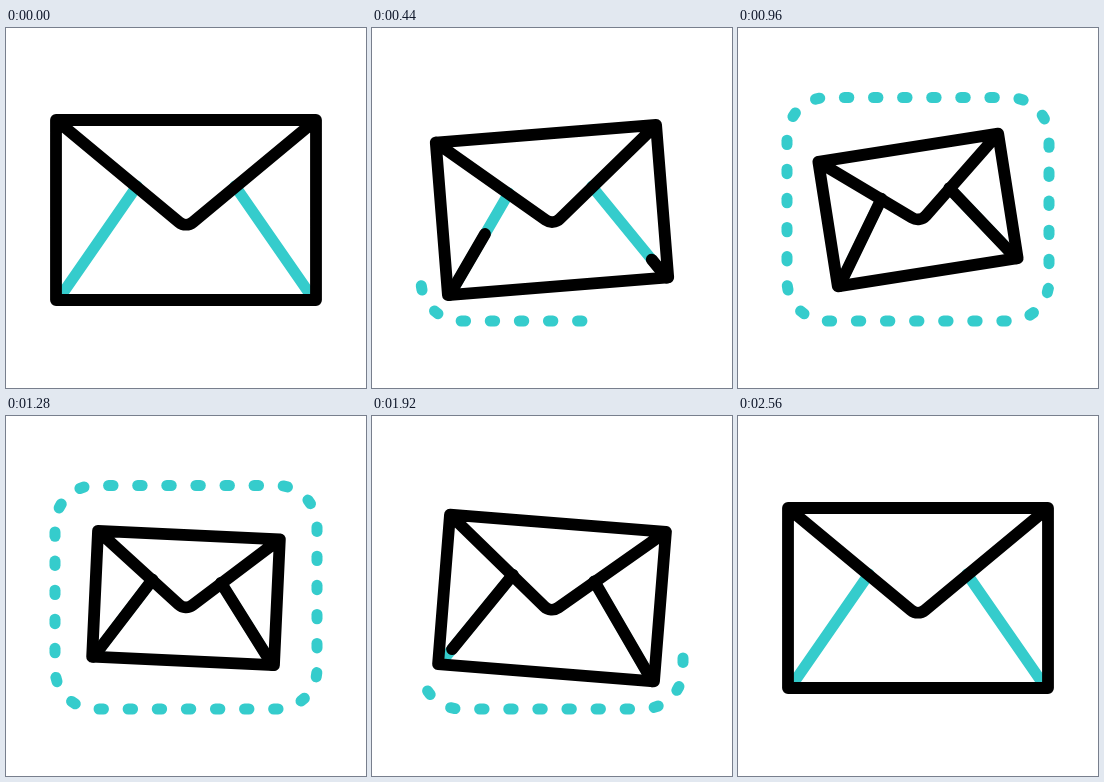
These frames come from a looping animation (360 px wide and 360 px high, 2.6 s). An HTML page with a canvas:

```html
<!DOCTYPE html>
<html lang="en">
<head>
<meta charset="utf-8">
<title>Envelope</title>
<style>
  html, body { margin: 0; width: 100%; height: 100%; overflow: hidden; background: #fff; }
  canvas { display: block; width: 360px; height: 360px; }
</style>
</head>
<body>
<canvas id="stage"></canvas>
<script>
const LOOP = 2600, STEP = 40, HOLD = 120;
const BLACK = '#000', CYAN = '#35cccc';
const LINE = 11.8;
const CENTER = { x: 180, y: 182 };
const TRAIL = { left: 49, right: 311, top: 69.5, bottom: 293, r: 40, pitch: 29.1, count: 31, reach: 945 };

const canvas = document.getElementById('stage');
const ctx = canvas.getContext('2d');
const ratio = window.devicePixelRatio || 1;
canvas.width = canvas.height = 360 * ratio;
ctx.scale(ratio, ratio);
ctx.lineCap = ctx.lineJoin = 'round';

const progress = (t, from, to) => Math.min(1, Math.max(0, (t - from) / (to - from)));
const smooth = (t, from, to) => {
  const u = progress(t, from, to);
  return u * u * (3 - 2 * u);
};
const cubic = (t, from, to) => {
  const u = progress(t, from, to);
  return u < 0.5 ? 4 * u ** 3 : 1 - 4 * (1 - u) ** 3;
};
const mix = (a, b, u) => ({ x: a.x + (b.x - a.x) * u, y: a.y + (b.y - a.y) * u });

function keyed(t, keys) {
  let value = keys[0][1];
  for (let i = 1; i < keys.length; i++) {
    const [t0, v0] = keys[i - 1], [t1, v1] = keys[i];
    if (t >= t0) value = v0 + (v1 - v0) * progress(t, t0, t1);
  }
  return value;
}

function line(a, b, color, width = LINE) {
  ctx.strokeStyle = color;
  ctx.lineWidth = width;
  ctx.beginPath();
  ctx.moveTo(a.x, a.y);
  ctx.lineTo(b.x, b.y);
  ctx.stroke();
}

// Point on the rounded frame, counter-clockwise from the lower left corner.
function trailPoint(distance) {
  const { left, right, top, bottom, r } = TRAIL;
  const w = right - left - 2 * r, h = bottom - top - 2 * r, arc = r * Math.PI / 2;
  const total = 2 * (w + h) + 4 * arc;
  let d = (distance + r * Math.PI / 18) % total;
  if (d < 0) d += total;
  const corners = [
    [left + r, bottom - r, w], [right - r, bottom - r, h],
    [right - r, top + r, w], [left + r, top + r, h]
  ];
  for (let i = 0; i < 4; i++) {
    const [cx, cy, side] = corners[i];
    const angle = Math.PI - i * Math.PI / 2;
    if (d <= arc) {
      const a = angle - d / r;
      return { x: cx + r * Math.cos(a), y: cy + r * Math.sin(a) };
    }
    d -= arc;
    if (d <= side) {
      const a = angle - Math.PI / 2;
      return {
        x: cx + r * Math.cos(a) + d * Math.sin(a),
        y: cy + r * Math.sin(a) - d * Math.cos(a)
      };
    }
    d -= side;
  }
}

function drawTrail(t) {
  const start = keyed(t, [[440, 0], [960, 29.2], [1280, 33], [1600, 38.5], [1920, 18.5], [2360, 0]]);
  const end = TRAIL.reach * (cubic(t, 30, 1140) - cubic(t, 1224, 2469));
  if (end < 2 + (t < 1224 ? 2 : 0)) return;
  for (let k = 0; k < TRAIL.count; k++) {
    const d = start + k * TRAIL.pitch;
    if (d > end) break;
    line(trailPoint(d - 2.2), trailPoint(d + 2.2), CYAN, 11);
  }
}

function drawFold(corner, inner, from, to) {
  line(corner, inner, CYAN, 11);
  if (to > from) line(mix(corner, inner, from), mix(corner, inner, to), BLACK);
}

function drawEnvelope(t) {
  const scale = 1 - 0.3 * (cubic(t, 70, 810) - cubic(t, 1550, 2320));
  const degrees = -9.1 * cubic(t, 70, 810) + 17.3 * cubic(t, 850, 1605) - 8.2 * cubic(t, 1550, 2320);
  const cos = scale * Math.cos(degrees * Math.PI / 180);
  const sin = scale * Math.sin(degrees * Math.PI / 180);
  const place = (x, y) => ({ x: CENTER.x + x * cos - y * sin, y: CENTER.y + x * sin + y * cos });

  const tl = place(-130, -90), tr = place(130, -90);
  const br = place(130, 90), bl = place(-130, 90);
  const tip = place(0, 18);

  drawFold(place(-128, 90), place(-49, -24), smooth(t, 1800, 2260), smooth(t, 180, 640));
  drawFold(place(128, 90), place(49, -24), smooth(t, 1940, 2340), smooth(t, 320, 740));

  ctx.strokeStyle = BLACK;
  ctx.lineWidth = LINE;
  ctx.beginPath();
  ctx.moveTo(tl.x, tl.y);
  for (const p of [tr, br, bl]) ctx.lineTo(p.x, p.y);
  ctx.closePath();
  ctx.moveTo(tl.x, tl.y);
  ctx.arcTo(tip.x, tip.y, tr.x, tr.y, 11);
  ctx.lineTo(tr.x, tr.y);
  ctx.stroke();
}

function draw(now) {
  let t = Math.floor((now % LOOP) / STEP) * STEP;
  if (t < HOLD) t = 0;
  ctx.fillStyle = '#fff';
  ctx.fillRect(0, 0, 360, 360);
  drawTrail(t);
  drawEnvelope(t);
}

let origin = null;
function tick(now) {
  if (origin === null) origin = now;
  draw(Math.max(0, now - origin));
  requestAnimationFrame(tick);
}
draw(0);
requestAnimationFrame(tick);
</script>
</body>
</html>
```
